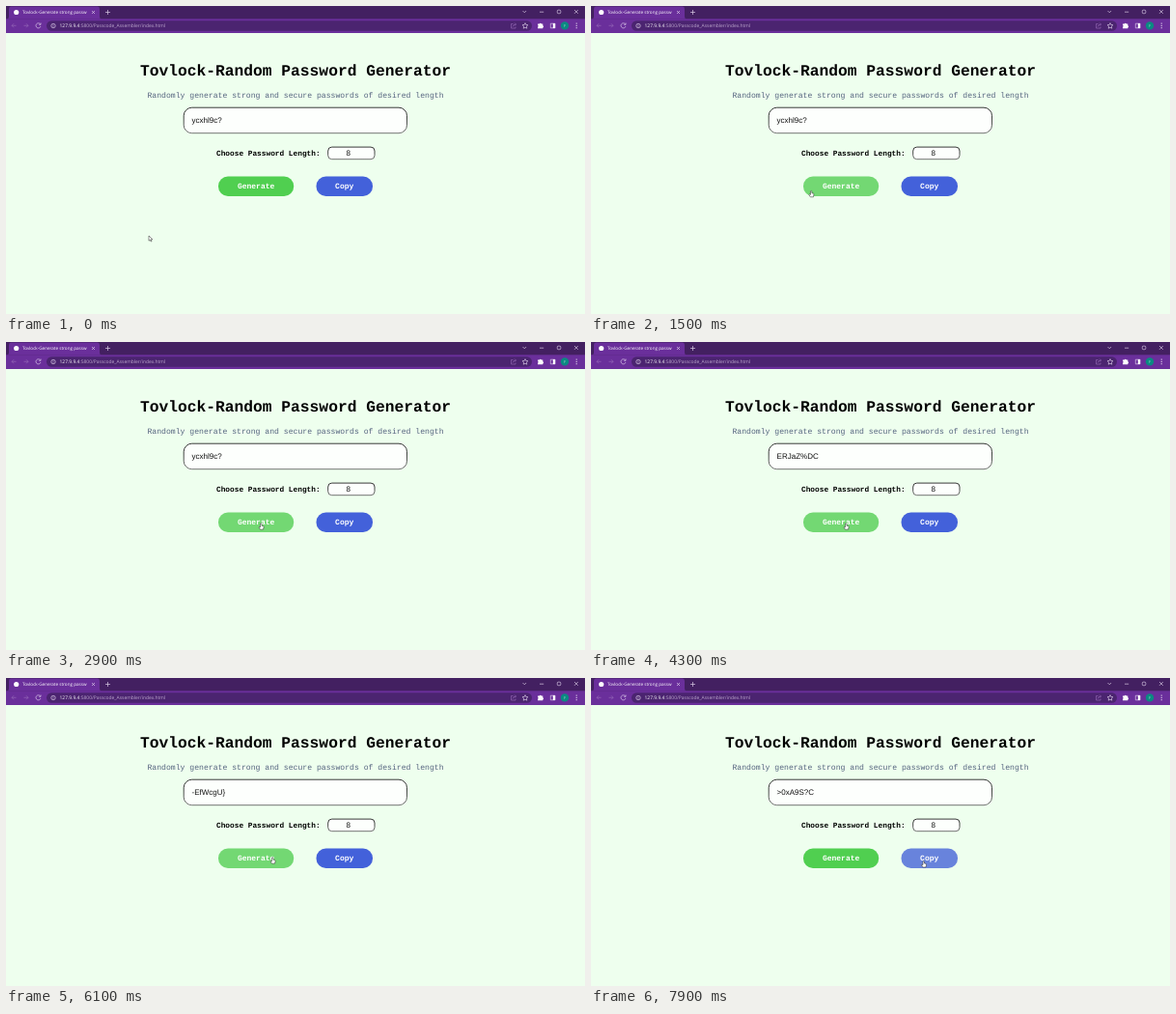
Write an HTML page that moves like this. It is 600x319 px and loops after 8 s.

```html
<!DOCTYPE html>
<html lang="en">
<head>
<meta charset="utf-8">
<title>Password generator demo</title>
<style>
  html, body { margin: 0; width: 100%; height: 100%; overflow: hidden; background: #eeffee; }
  svg { display: block; width: 100vw; height: 100vh; text-rendering: geometricPrecision; }
  .ui { font-family: "Open Sans", sans-serif; fill: #fff; }
  .mono { font-family: "Liberation Mono", monospace; }
  .field { font: 8px "Liberation Sans", sans-serif; fill: #111; }
  .bold { font-weight: 700; }
  .mid { text-anchor: middle; }
  .line { fill: none; stroke: #eee3f6; stroke-width: .6; }
  .dim { stroke: #9a70bb; }
  .box { fill: #fdfffd; stroke: url(#inset); stroke-width: .9; }
  .cursor path { fill: #fff; stroke: #333; stroke-width: .55; stroke-linejoin: round; }
</style>
</head>
<body>
<svg viewBox="0 0 600 319">
  <defs>
    <clipPath id="tabClip"><path d="M16 0H85V13H16Z"/></clipPath>
    <linearGradient id="inset" x2="0" y2="1">
      <stop offset=".3" stop-color="#222"/>
      <stop offset="1" stop-color="#666"/>
    </linearGradient>
  </defs>
  <rect width="600" height="319" fill="#eeffee"/>

  <!-- Browser window -->
  <rect width="600" height="28" fill="#6a2f9b"/>
  <rect width="600" height="13.3" fill="#432061"/>
  <path d="M1 13.4Q3 13.4 3 11V3Q3 .6 5.5 .6H94.5Q97 .6 97 3V11Q97 13.4 99 13.4Z" fill="#6a2f9b"/>
  <circle cx="10.7" cy="6.5" r="2.6" fill="#fff"/>
  <text class="ui" x="17" y="8.3" font-size="4.6" clip-path="url(#tabClip)">Tovlock-Generate strong passw</text>
  <path class="line" d="M89 5l3 3m0-3l-3 3M103 6.5h5m-2.500-2.500v5"/>
  <path class="line" d="M535.5 5l1.800 1.800 1.800-1.800M553 6.200h4.200M589 4l3.800 3.800m0-3.800l-3.800 3.800"/>
  <rect class="line" x="571.3" y="4.2" width="3.500" height="3.500" rx="1"/>
  <path class="line dim" d="M10.500 20.300H6m2-2l-2 2 2 2M18.500 20.300H23m-2-2l2 2-2 2"/>
  <path class="line" d="M35.500 18.800a2.500 2.500 0 1 0 .4 2.300M36 17.500v1.800h-1.800"/>
  <rect x="42" y="15.300" width="503" height="10.400" rx="5.200" fill="#4b2470"/>
  <circle class="line" cx="49" cy="20.500" r="2.200"/>
  <path class="line" d="M49 20.200v1.400M49 19.100v.5"/>
  <text class="ui" x="55.500" y="22.300" font-size="4.950">127.9.9.4<tspan fill="#bda8cd">:5800/Passcode_Assembler/index.html</tspan></text>
  <path class="line dim" d="M525.500 18.500h-2v4.500h4.500v-1.500M525 21.500q.2-2.300 3.500-2.500m-1.500-1.500l1.500 1.500-1.500 1.500"/>
  <path class="line" d="M538 17.600l.9 1.900 2 .2-1.500 1.400.4 2.100-1.800-1-1.800 1 .4-2.100-1.500-1.400 2-.2Z"/>
  <path d="M551 18.500h1.700a1.100 1.100 0 0 1 2.100 0h1.500v1.700a1.100 1.100 0 0 1 0 2.100v1H551v-1.500a1.100 1.100 0 0 0 0-2Z" fill="#fff"/>
  <path class="line" d="M564.300 18.200h4.600v4.600h-4.600Z"/>
  <path d="M566.800 18h2.300v5h-2.300Z" fill="#fff"/>
  <circle cx="579" cy="20.400" r="4.200" fill="#0b8a82"/>
  <text class="ui mid" x="579" y="21.800" font-size="4" opacity=".65">F</text>
  <path d="M591.200 17.600v1m0 1.300v1m0 1.300v1" stroke="#fff" stroke-width="1"/>

  <!-- Page -->
  <g class="mono mid">
    <text class="bold" x="300" y="72" font-size="16.260">Tovlock-Random Password Generator</text>
    <text x="300" y="94.600" font-size="8.140" fill="#55637f">Randomly generate strong and secure passwords of desired length</text>
    <text class="bold" x="271.800" y="154.500" font-size="7.800">Choose Password Length:</text>
  </g>
  <rect class="box" x="184.200" y="105.200" width="231.300" height="26.500" rx="8.500"/>
  <text class="field" id="password" x="192.600" y="121.400"></text>
  <rect class="box" x="333.700" y="146.100" width="48.300" height="12.600" rx="4"/>
  <text class="field mid" x="354.800" y="155.300">8</text>
  <rect id="generate" x="220" y="176.500" width="78.200" height="20.500" rx="10"/>
  <rect id="copy" x="321.500" y="176.500" width="58.500" height="20.500" rx="10"/>
  <g class="mono mid bold" fill="#fff" font-size="8">
    <text x="259.100" y="189.400">Generate</text>
    <text x="350.700" y="189.400">Copy</text>
  </g>

  <g class="cursor" id="cursor">
    <path id="arrow" d="M0 0V5.200L1.300 4.200 2.200 6 3 5.600 2.200 3.800H3.900Z"/>
    <path id="hand" d="M-.7 .7Q0-.3 .7 .7V2.700L2.400 3.100Q3 3.300 2.800 4L2.300 6.700H-.8L-2.300 4.400Q-2 3.500-.7 4.300Z"/>
  </g>
</svg>
<script>
const el = id => document.getElementById(id);
const DURATION = 8000, STEP = 100;

// [time, x, y] of the pointer tip
const path = [
  [0, 148, 238], [900, 167.7, 191.3], [1900, 261, 191],
  [2000, 261, 191], [2200, 262, 193.5], [2400, 262, 193.5], [2900, 264.3, 187.5],
  [5500, 264.3, 187.5], [6100, 276.3, 185.5],
  [7400, 276.3, 185.5], [7900, 344.7, 189.3], [8000, 344.7, 189.3]
];
const passwords = [[0, "ycxhl9c?"], [3300, "ERJaZ%DC"], [5400, "-EfWcgU}"], [6400, ">0xA9S?C"]];
const buttons = [
  { id: "generate", left: 220, right: 298.2, color: "#50cf50", hover: "#73d873" },
  { id: "copy", left: 321.5, right: 380, color: "#4361da", hover: "#6883dc" }
];

function pointerAt(t) {
  const i = path.findIndex(p => p[0] > t);
  const [t0, x0, y0] = path[i - 1], [t1, x1, y1] = path[i];
  const p = (t - t0) / (t1 - t0), k = p * p * (3 - 2 * p);
  return [x0 + (x1 - x0) * k, y0 + (y1 - y0) * k];
}

function draw(t) {
  const [x, y] = pointerAt(t);
  let pointing = false;
  for (const b of buttons) {
    const over = x > b.left && x < b.right && y > 176.5 && y < 197;
    el(b.id).setAttribute("fill", over ? b.hover : b.color);
    pointing ||= over;
  }
  el("cursor").setAttribute("transform", `translate(${x} ${y})`);
  el("hand").style.display = pointing ? "" : "none";
  el("arrow").style.display = pointing ? "none" : "";
  el("password").textContent = passwords.findLast(p => p[0] <= t)[1];
}

const start = performance.now();
function frame() {
  const t = (performance.now() - start) % DURATION;
  draw(Math.floor(t / STEP) * STEP);
  requestAnimationFrame(frame);
}
frame();
</script>
</body>
</html>
```
